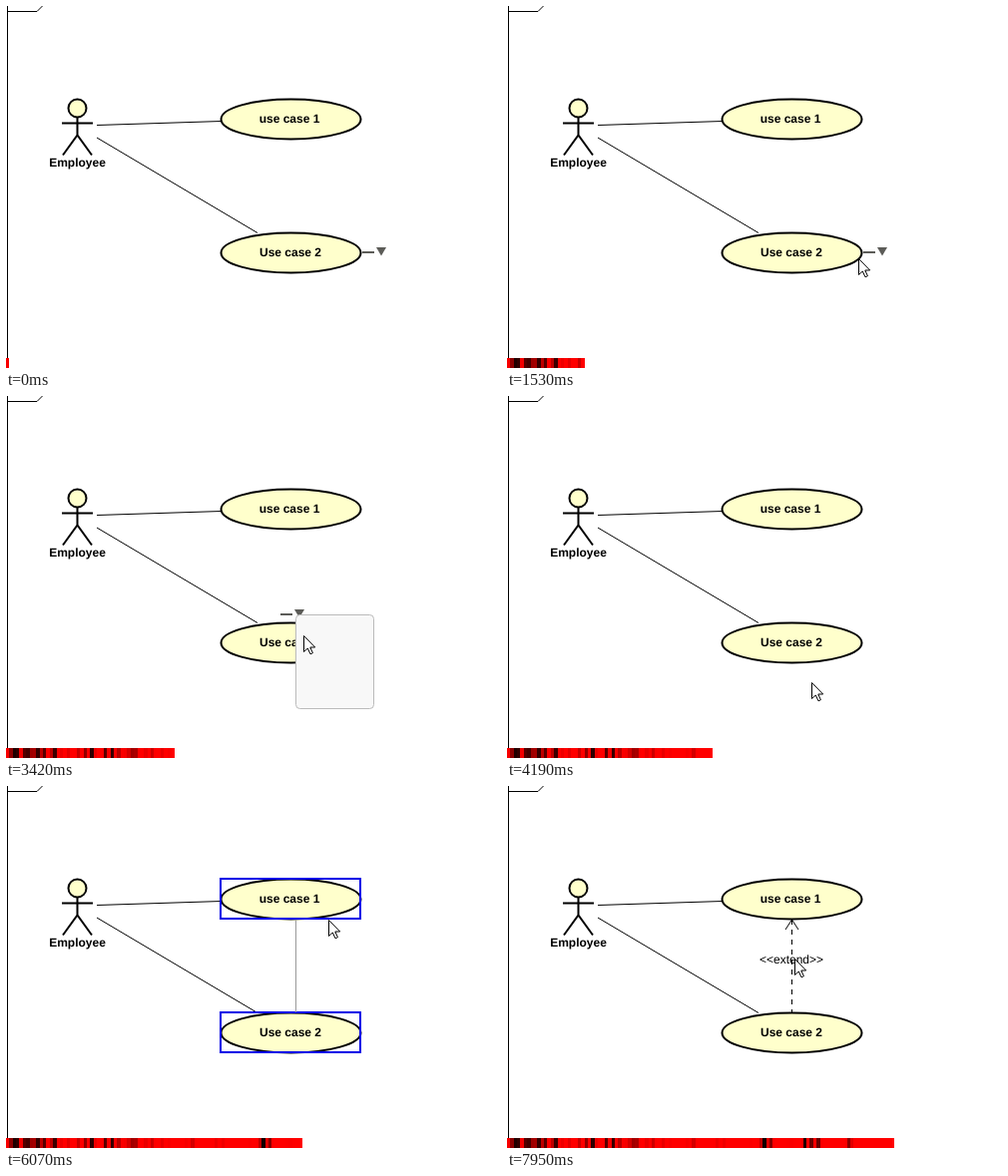
An HTML page for the animation above (8 s loop, 496x363 px).

```html
<!DOCTYPE html>
<html lang="en">
<head>
<meta charset="utf-8">
<title>Use case diagram</title>
<style>
  html, body { margin: 0; width: 100%; height: 100%; overflow: hidden; background: #fff; }
  svg { display: block; width: 496px; height: 363px; }
  text { font: 12px "Liberation Sans", Arial, sans-serif; text-anchor: middle; text-rendering: geometricPrecision; }
  .bold { font-weight: bold; }
  .line { fill: none; stroke: #000; }
  .crisp { shape-rendering: crispEdges; }
  .shape { fill: #ffc; stroke: #000; stroke-width: 2; }
  .select { fill: none; stroke: #0000e6; stroke-width: 2; }
  .handle { fill: #fff; stroke: #000; }
</style>
</head>
<body>
<svg viewBox="0 0 496 363">
  <defs><clipPath id="played"><rect id="playedWidth" y="353" height="10"/></clipPath></defs>
  <path class="line crisp" d="M1.5 0V363M1 5.5H31"/>
  <path class="line" d="M31 5.5L36.5 0"/>

  <path class="line" d="M91 119.5L216 115.5M91 132L252 227.5"/>
  <circle class="shape" cx="71.5" cy="102.5" r="9"/>
  <path class="line" stroke-width="2" d="M71.5 111.5V130M56 117.5H87M57 149.5L71.5 129.5L86 149.5"/>
  <text class="bold" x="71.5" y="161">Employee</text>

  <ellipse class="shape" cx="285.5" cy="113.5" rx="70" ry="20"/>
  <text class="bold" x="284" y="117">use case 1</text>
  <ellipse class="shape" cx="285.5" cy="247.5" rx="70" ry="20"/>
  <text class="bold" x="285" y="251">Use case 2</text>

  <rect id="sourceBox" class="select" x="215" y="227" width="140" height="40"/>
  <rect id="targetBox" class="select" x="215" y="93" width="140" height="40"/>
  <path id="preview" class="crisp" stroke="#999" d="M290.5 134V227"/>

  <g id="extend">
    <text x="285" y="178">&lt;&lt;extend&gt;&gt;</text>
    <path class="line" stroke-dasharray="5" d="M285.5 134V227"/>
    <path class="line" d="M279 144L285.5 134L292 144"/>
  </g>
  <g id="handles">
    <circle class="handle" cx="285.5" cy="133.5" r="5"/>
    <circle class="handle" cx="285.5" cy="227.5" r="5"/>
  </g>

  <g id="connector" fill="#5c5c58">
    <rect x="357" y="246" width="12" height="2"/>
    <path d="M371 242H381L376 250.5Z"/>
  </g>
  <rect id="menu" x="290.5" y="219.5" width="78" height="94" rx="4" fill="#f8f8f8" stroke="#bbb"/>

  <circle id="ring" r="12" fill="#fff200" fill-opacity=".6"/>
  <path id="cursor" class="handle" d="M.5 .5V16.5L4.3 13L7 18.8L9.4 17.7L6.8 12H11.7Z"/>
  <g id="bar" class="crisp" clip-path="url(#played)"></g>
</svg>
<script>
const LOOP = 8000, STEPS = 114, STEP = 7950 / STEPS, BAR_STEP = 3.372, CLICK = 280;
const el = id => document.getElementById(id);
const show = (id, on) => el(id).setAttribute("visibility", on ? "visible" : "hidden");
const place = (id, x, y) => el(id).setAttribute("transform", `translate(${Math.round(x)} ${Math.round(y)})`);

// Places where the pointer rests, each from arrive to leave
const stop = (x, y, arrive, leave) => ({ x, y, arrive, leave });
const openMenu = stop(295, 219, 2550, 3150);
const pickExtend = stop(305, 287, 3870, 4250);
const pickTarget = stop(293, 119, 6500, 6920);
const deselect = stop(363, 186, 7250, 7500);
const clicks = [openMenu, pickExtend, pickTarget, deselect];
const stops = [
  stop(454, 214, 0, 70), stop(303, 242, 840, 1050), stop(352, 253, 1530, 1750),
  openMenu, pickExtend, stop(312, 141, 5240, 5240), stop(346, 146, 5520, 5700),
  pickTarget, deselect, stop(288, 173, 7900, LOOP)
];

function pointerAt(t) {
  const i = stops.findIndex(s => t <= s.leave);
  const to = stops[i], from = stops[i - 1] || to;
  if (t >= to.arrive) return to;
  const p = (t - from.leave) / (to.arrive - from.leave), e = p * p * (3 - 2 * p);
  return { x: from.x + (to.x - from.x) * e, y: from.y + (to.y - from.y) * e };
}

// Red columns, with dark ones growing rarer to the right
function buildBar() {
  let seed = 17;
  const random = () => (seed = seed * 16807 % 2147483647) / 2147483647;
  el("bar").innerHTML = Array.from({ length: STEPS + 1 }, (_, i) => {
    const x = Math.round(i * BAR_STEP), width = Math.round((i + 1) * BAR_STEP) - x;
    const red = Math.round(255 * (1 - random() ** (0.4 + i / 6)));
    return `<rect x="${x}" y="353" width="${width}" height="10" fill="rgb(${red},0,0)"/>`;
  }).join("");
}

function draw(now) {
  const step = Math.min(STEPS, Math.floor((now % LOOP + 6) / STEP));
  const t = step * STEP;
  const between = (a, b) => t >= a && t < b;
  const { x, y } = pointerAt(t);
  const menuOpen = openMenu.arrive + CLICK, menuClosed = pickExtend.arrive + CLICK;
  const linked = pickTarget.arrive + CLICK;

  el("playedWidth").setAttribute("width", Math.round((step + 1) * BAR_STEP));
  show("cursor", step > 0);
  place("cursor", x, y);
  show("ring", clicks.some(s => between(s.arrive, s.arrive + CLICK)));
  place("ring", x, y);

  const moved = t >= 2300;
  place("connector", moved ? -82 : 0, moved ? -28 : 0);
  show("connector", t < menuClosed);
  show("menu", between(menuOpen, menuClosed));
  show("sourceBox", between(menuClosed + 120, linked));
  show("targetBox", between(5960, linked));
  show("preview", between(5960, linked));
  show("extend", t >= linked);
  show("handles", between(linked, deselect.arrive));
}

buildBar();
const start = performance.now();
function tick() {
  draw(performance.now() - start);
  requestAnimationFrame(tick);
}
tick();
</script>
</body>
</html>
```
